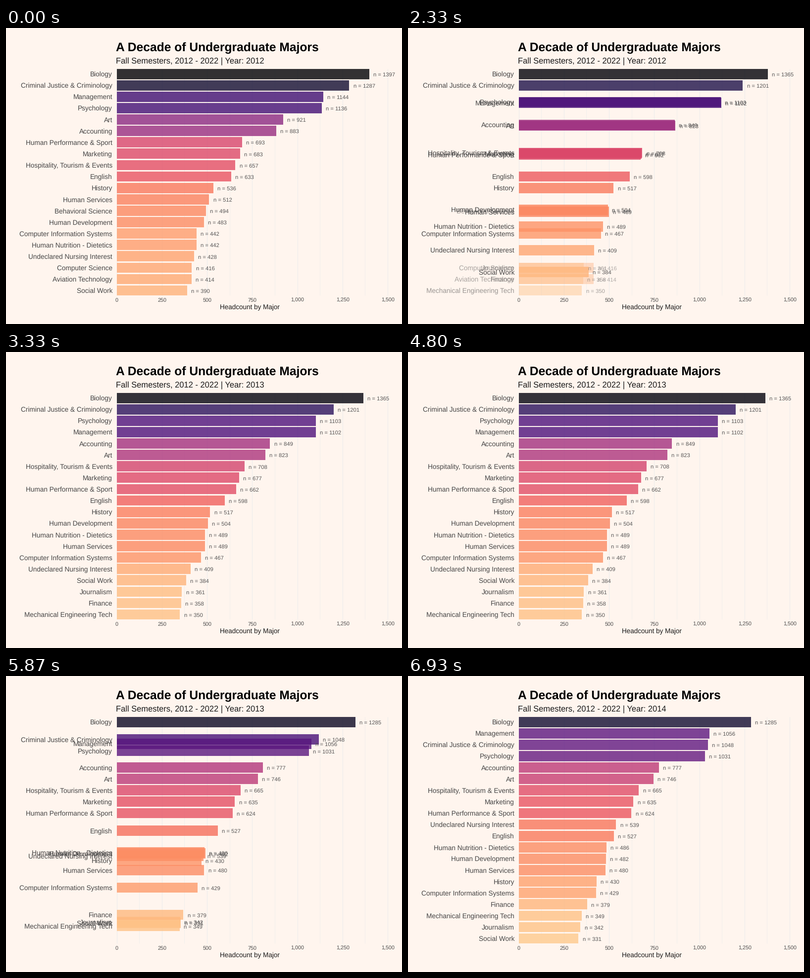
Write a matplotlib script that moves like this. It is 800x600 px and loops after 8 s.

```python
import matplotlib
import matplotlib.pyplot as plt
from matplotlib.animation import FuncAnimation
from matplotlib.patches import Rectangle

W, H, DPI = 800, 600, 100
FRAMES, INTERVAL = 200, 40
TICK_MS = 1000 / 15               # the chart itself moves at 15 steps a second
X0, X_SCALE = 223.6, 0.365        # pixel of zero, pixels per head
TOP, ROW, BAR = 93.155, 23.103, 20.77  # first row centre, row pitch, bar height
PANEL = (83, 542)
FIRST_MOVE, PERIOD, MOVE = 17, 53, 35  # in ticks
LOW, HIGH = 195, 1397             # range of the colour scale
YEARS = (2012, 2013, 2014)

# Headcount per year; None means outside the top twenty
MAJORS = {
    "Biology": (1397, 1365, 1285),
    "Criminal Justice & Criminology": (1287, 1201, 1048),
    "Management": (1144, 1102, 1056),
    "Psychology": (1136, 1103, 1031),
    "Art": (921, 823, 746),
    "Accounting": (883, 849, 777),
    "Human Performance & Sport": (693, 662, 624),
    "Marketing": (683, 677, 635),
    "Hospitality, Tourism & Events": (657, 708, 665),
    "English": (633, 598, 527),
    "History": (536, 517, 430),
    "Behavioral Science": (494, None, None),
    "Human Development": (483, 504, 482),
    "Computer Information Systems": (442, 467, 429),
    "Human Nutrition - Dietetics": (442, 489, 486),
    "Human Services": (512, 489, 480),
    "Undeclared Nursing Interest": (428, 409, 539),
    "Computer Science": (416, None, None),
    "Aviation Technology": (414, None, None),
    "Social Work": (390, 384, 331),
    "Journalism": (None, 361, 342),
    "Finance": (None, 358, 379),
    "Mechanical Engineering Tech": (None, 350, 349),
}


def rank_year(year):
    present = [m for m in MAJORS if MAJORS[m][year] is not None]
    present.sort(key=lambda m: -MAJORS[m][year])
    return {m: r for r, m in enumerate(present)}


RANKS = [rank_year(y) for y in range(len(YEARS))]
magma = matplotlib.colormaps["magma"]

plt.rcParams["font.family"] = "Liberation Sans"
plt.rcParams["text.hinting"] = "none"
fig = plt.figure(figsize=(W / DPI, H / DPI), dpi=DPI, facecolor="#FFF5EE")
ax = fig.add_axes([0, 0, 1, 1])
ax.set(xlim=(0, W), ylim=(H, 0))
ax.axis("off")


def put_text(x, y, text, px, color, **kw):
    return ax.text(x, y, text, fontsize=px * 72 / DPI, color=color,
                   va="baseline", **kw)


for i in range(13):
    x = X0 + i * 125 * X_SCALE
    major = i % 2 == 0
    ax.plot([x, x], PANEL, color="#EBEBEB", lw=0.7 if major else 0.5,
            solid_capstyle="butt", zorder=0)
    if major:
        put_text(x + 0.4, 555, f"{i * 125:,}", 10.8, "#4D4D4D", ha="center")

put_text(222, 46.5, "A Decade of Undergraduate Majors", 24.6, "black",
         weight="bold")
subtitle = put_text(222, 71, "", 16.5, "#1A1A1A")
put_text(492.5, 570, "Headcount by Major", 13.5, "#1A1A1A", ha="center")


class Entry:
    """Bar, name and count label of one major."""

    def __init__(self, name):
        self.name = name
        self.bar = ax.add_patch(Rectangle((X0, 0), 0, BAR, lw=0, zorder=1))
        self.title = put_text(215, 0, name, 13.6, "#454545", ha="right",
                              zorder=2)
        self.label = put_text(0, 0, "", 11.3, "#555555", zorder=3)

    def update(self, year, t):
        old, new = MAJORS[self.name][year:year + 2]
        r_old, r_new = (RANKS[y].get(self.name) for y in (year, year + 1))
        alpha = 1
        if old is None:
            old, r_old, alpha = new, r_new, t
        elif new is None:
            new, r_new, alpha = old, r_old, 1 - t
        shown = old is not None and alpha > 0
        for part in (self.bar, self.title, self.label):
            part.set_visible(shown)
        if not shown:
            return
        value = old + (new - old) * t
        y = TOP + ROW * (r_old + (r_new - r_old) * t)
        width = value * X_SCALE
        self.bar.set_y(y - BAR / 2)
        self.bar.set_width(width)
        self.bar.set_facecolor(magma((HIGH - value) / (HIGH - LOW)))
        self.bar.set_alpha(0.8 * alpha)
        self.title.set_y(y + 5.1)
        self.title.set_alpha(alpha)
        self.label.set_position((X0 + width + 8.2, y + 4.6))
        self.label.set_text(f"n = {old if t < 0.5 else new}")
        self.label.set_alpha(alpha)


def ease(p):
    return 4 * p ** 3 if p < 0.5 else 1 - 4 * (1 - p) ** 3


entries = [Entry(name) for name in MAJORS]


def draw(frame):
    tick = int(frame * INTERVAL / TICK_MS + 0.45)  # nearest tick
    year = 0 if tick < FIRST_MOVE + PERIOD else 1
    step = min(max(tick - FIRST_MOVE - PERIOD * year, 0), MOVE)
    t = ease(step / MOVE)
    for entry in entries:
        entry.update(year, t)
    # The subtitle switches one tick after the count labels
    closest = year + (step > MOVE // 2 + 1)
    subtitle.set_text(f"Fall Semesters, 2012 - 2022 | Year: {YEARS[closest]}")
    return []


anim = FuncAnimation(fig, draw, frames=FRAMES, interval=INTERVAL,
                     init_func=lambda: draw(0), repeat=True, repeat_delay=0,
                     cache_frame_data=False)
plt.show()
```
